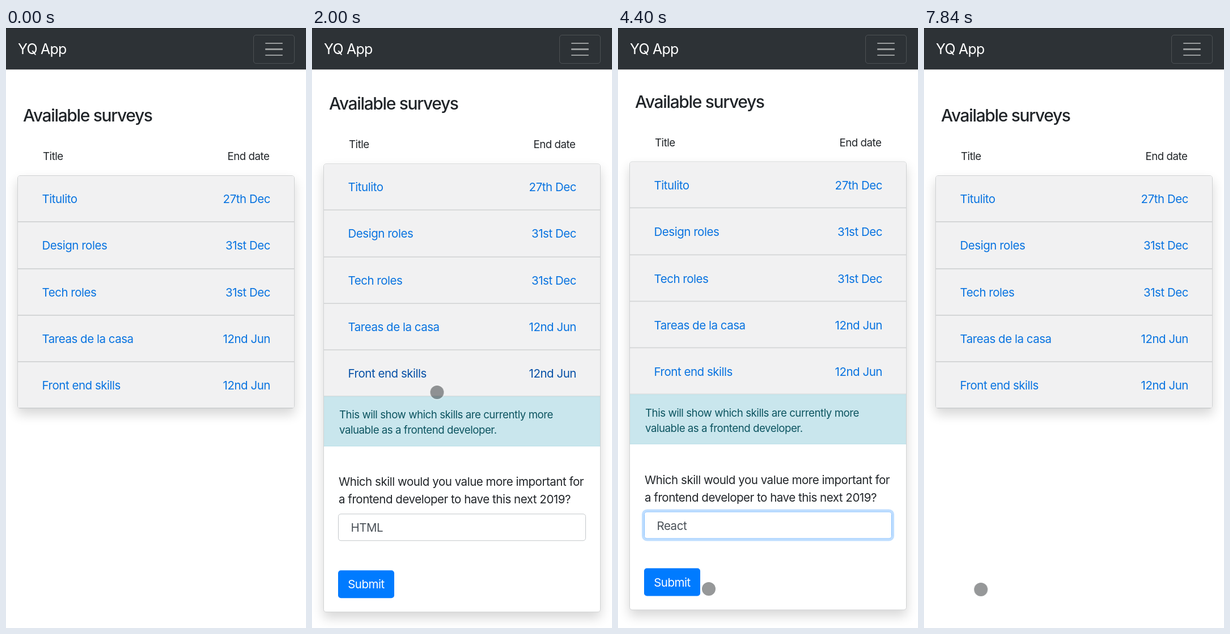
Write an HTML page that moves like this. It is 529 px wide and 1059 px high and loops after 7.92 s.

```html
<!DOCTYPE html>
<html lang="en">
<head>
<meta charset="utf-8">
<title>Surveys</title>
<style>
  * { box-sizing: border-box; margin: 0; padding: 0; }
  html, body { width: 100%; height: 100%; overflow: hidden; background: #fff; }
  body {
    position: relative;
    font: 20.5px Inter, "Open Sans", sans-serif;
    letter-spacing: -.023em;
    color: #212529;
    white-space: nowrap;
  }
  ul { list-style: none; }

  /* every part shares one 7.92 s loop */
  .page, .panel, .cursor, .ring, .active, .select, .before, .after, .menu, .picked, .status {
    animation: 7.92s linear infinite;
  }

  .bar {
    position: absolute; inset: 0 0 auto; height: 73px;
    background: #2d3236; border-top: 1px solid #202427;
    box-shadow: 0 1px rgba(45, 50, 54, .25);
    font-size: 25px; letter-spacing: -.03em; line-height: 73px;
    color: #fff; padding-left: 21px;
  }
  .toggle {
    position: absolute; left: 436px; top: 10.5px; width: 72.5px; height: 51.5px;
    border: 1px solid rgba(255, 255, 255, .15); border-radius: 5px;
  }
  .toggle i {
    display: block; width: 31px; height: 2.5px; margin: 8px 0 0 20px;
    border-radius: 1px; background: rgba(255, 255, 255, .52);
  }
  .toggle i:first-child { margin-top: 13px; }

  .page { position: absolute; inset: 0; animation-name: scroll; }
  h1 {
    position: absolute; left: 30px; top: 134px; line-height: 40px;
    font-size: 30px; font-weight: 500; letter-spacing: -.045em;
  }
  .head {
    position: absolute; left: 65px; right: 64.5px; top: 212px;
    display: flex; justify-content: space-between;
    font-size: 18.7px; line-height: 30px;
  }
  .card {
    position: absolute; left: 20px; top: 260px; width: 489px;
    border: 1px solid #d0d2d3; border-radius: 5px; background: #fff;
    box-shadow: 0 10px 20px rgba(0, 0, 0, .16);
    overflow: hidden;
  }
  .row {
    display: flex; justify-content: space-between;
    height: 82.35px; padding: 0 42px 0 42.5px; line-height: 82px;
    background: #f1f1f2; border-bottom: 2px solid #d4d6d7; color: #0873e0;
  }
  .active { height: 81px; border-bottom: 1px solid #d0d2d3; animation-name: hover; }

  .panel { position: relative; height: 0; overflow: hidden; animation-name: expand; }
  .alert {
    height: 87.5px; padding: 18px 27px; line-height: 27px; font-size: 18.7px;
    background: #c9e6ed; border: solid #b9dfe7; border-width: 1px 0; color: #0c5460;
  }
  .ask { position: absolute; left: 26px; top: 135.7px; line-height: 30.8px; }
  .select {
    position: absolute; left: 25px; top: 206.3px; width: 436.5px; height: 48.7px;
    border: 1px solid #c3c7ca; border-radius: 5px; color: #495057;
    line-height: 47px; animation-name: focus;
  }
  .select span { position: absolute; left: 21.5px; }
  .before { animation-name: before; }
  .after { animation-name: after; }
  .submit {
    position: absolute; left: 25px; top: 306.3px; width: 99px; height: 49px;
    border-radius: 5px; background: #007bff; color: #fff;
    line-height: 50px; text-align: center;
  }

  .status {
    position: absolute; left: -1px; top: 1033px; width: 176px; height: 27px;
    padding-left: 4px; line-height: 28px; font-size: 15.5px; letter-spacing: -.01em;
    background: #fff; color: #63676a; border: 1px solid #b9bbbc; border-radius: 0 5px 0 0;
    box-shadow: 0 0 16px rgba(0, 0, 0, .16); animation-name: waiting;
  }

  .menu {
    position: absolute; left: 33px; top: 859px; width: 437.5px; height: 240px;
    padding-top: 6px; border-radius: 6px; color: #202124;
    background: radial-gradient(ellipse 125px 105px at 55px 122px, #d2e4f0, rgba(236, 236, 237, 0)), #ececed;
    box-shadow: 0 0 0 1px rgba(0, 0, 0, .17), 0 8px 22px rgba(0, 0, 0, .28);
    animation-name: menu;
  }
  .menu li { position: relative; height: 28.25px; line-height: 24.5px; padding-left: 28px; }
  .menu svg { position: absolute; left: 7px; top: 7px; }
  .picked {
    position: absolute; inset: 6px 0 auto; color: #fff; background: #89cb77;
    animation-name: pick; animation-timing-function: step-end;
  }

  .cursor { position: absolute; left: 0; top: 0; animation-name: move; }
  .dot, .ring { position: absolute; border-radius: 50%; }
  .dot {
    inset: -12.2px auto auto -12.2px; width: 24.4px; height: 24.4px; background: rgba(45, 50, 52, .5);
    box-shadow: 0 0 0 1.5px rgba(255, 255, 255, .4);
    animation: shade 7.92s step-end infinite;
  }
  .ring {
    inset: -29px auto auto -29px; width: 58px; height: 58px; border: 2px solid #111;
    animation-name: press; animation-timing-function: step-end;
  }

  @keyframes move {
    0%, 3.54% { transform: translate(545px, 640px); animation-timing-function: ease-in-out; }
    13.13%, 27.27% { transform: translate(220.5px, 643px); animation-timing-function: ease-in-out; }
    32.32%, 36.36% { transform: translate(158.5px, 899px); animation-timing-function: ease-in-out; }
    46.46%, 56.57% { transform: translate(160px, 990px); animation-timing-function: ease-in-out; }
    64.65%, 100% { transform: translate(100.3px, 991px); }
  }
  @keyframes press {
    0%, 17.68%, 34.3%, 53%, 72.2%, 100% { visibility: hidden; }
    15.9%, 32.8%, 51%, 70.2% { visibility: visible; }
  }
  @keyframes shade {
    0%, 54.5%, 100% { background: rgba(45, 50, 52, .5); }
    34.3% { background: #606467; }
  }
  @keyframes hover {
    0%, 5.7% { color: #0873e0; }
    5.71%, 34.3% { color: #0650a6; }
    34.31%, 100% { color: #0873e0; }
  }
  @keyframes expand {
    0%, 16.26% { height: 0; animation-timing-function: ease; }
    20.68%, 75.69% { height: 380px; animation-timing-function: ease; }
    80.11%, 100% { height: 0; }
  }
  @keyframes scroll {
    0%, 21.21% { transform: none; animation-timing-function: ease-out; }
    27.27%, 75.69% { transform: translateY(-24.5px); animation-timing-function: ease-in; }
    76.3%, 100% { transform: none; }
  }
  @keyframes focus {
    0%, 34.3%, 70.7%, 100% { border-color: #c3c7ca; box-shadow: none; }
    34.31%, 70.69% { border-color: #80bdff; box-shadow: 0 0 0 4px rgba(0, 123, 255, .25); }
  }
  @keyframes before {
    0%, 53.9% { opacity: 1; }
    53.91%, 100% { opacity: 0; }
  }
  @keyframes after {
    0%, 53.9% { opacity: 0; }
    53.91%, 100% { opacity: 1; }
  }
  @keyframes menu {
    0%, 34.3%, 55.4%, 100% { opacity: 0; }
    34.31%, 53.9% { opacity: 1; }
  }
  /* the white-on-green copy shows one 28.25px row at a time */
  @keyframes pick {
    0% { clip-path: inset(0 0 169.5px); }
    36.6% { clip-path: inset(28.25px 0 141.25px); }
    39.7% { clip-path: inset(56.5px 0 113px); }
    41.8% { clip-path: inset(84.75px 0 84.75px); }
    43.8%, 100% { clip-path: inset(113px 0 56.5px); }
  }
  @keyframes waiting {
    0%, 72%, 87.1%, 100% { visibility: hidden; }
    72.01%, 87% { visibility: visible; }
  }
</style>
</head>
<body>
  <main class="page">
    <h1>Available surveys</h1>
    <div class="head"><span>Title</span><span>End date</span></div>
    <div class="card">
      <div class="row"><span>Titulito</span><span>27th Dec</span></div>
      <div class="row"><span>Design roles</span><span>31st Dec</span></div>
      <div class="row"><span>Tech roles</span><span>31st Dec</span></div>
      <div class="row"><span>Tareas de la casa</span><span>12nd Jun</span></div>
      <div class="row active"><span>Front end skills</span><span>12nd Jun</span></div>
      <div class="panel">
        <p class="alert">This will show which skills are currently more<br>valuable as a frontend developer.</p>
        <p class="ask">Which skill would you value more important for<br>a frontend developer to have this next 2019?</p>
        <div class="select"><span class="before">HTML</span><span class="after">React</span></div>
        <div class="submit">Submit</div>
      </div>
    </div>
  </main>

  <header class="bar">YQ App<div class="toggle"><i></i><i></i><i></i></div></header>

  <div class="status">Waiting for cv-mobile...</div>

  <div class="menu">
    <ul>
      <li><svg width="13" height="13" fill="none" stroke="currentColor" stroke-width="2.2" stroke-linecap="round" stroke-linejoin="round"><path d="M1.5 7.5 4.7 11 11 2"/></svg>HTML</li>
      <li>CSS</li>
      <li>Javascript</li>
      <li>jQuery</li>
      <li>React</li>
      <li>Angular</li>
      <li>Sass</li>
    </ul>
  </div>

  <div class="cursor"><div class="ring"></div><div class="dot"></div></div>

  <script>
    const list = document.querySelector('.menu ul');
    const picked = list.cloneNode(true);
    picked.className = 'picked';
    list.after(picked);
  </script>
</body>
</html>
```
